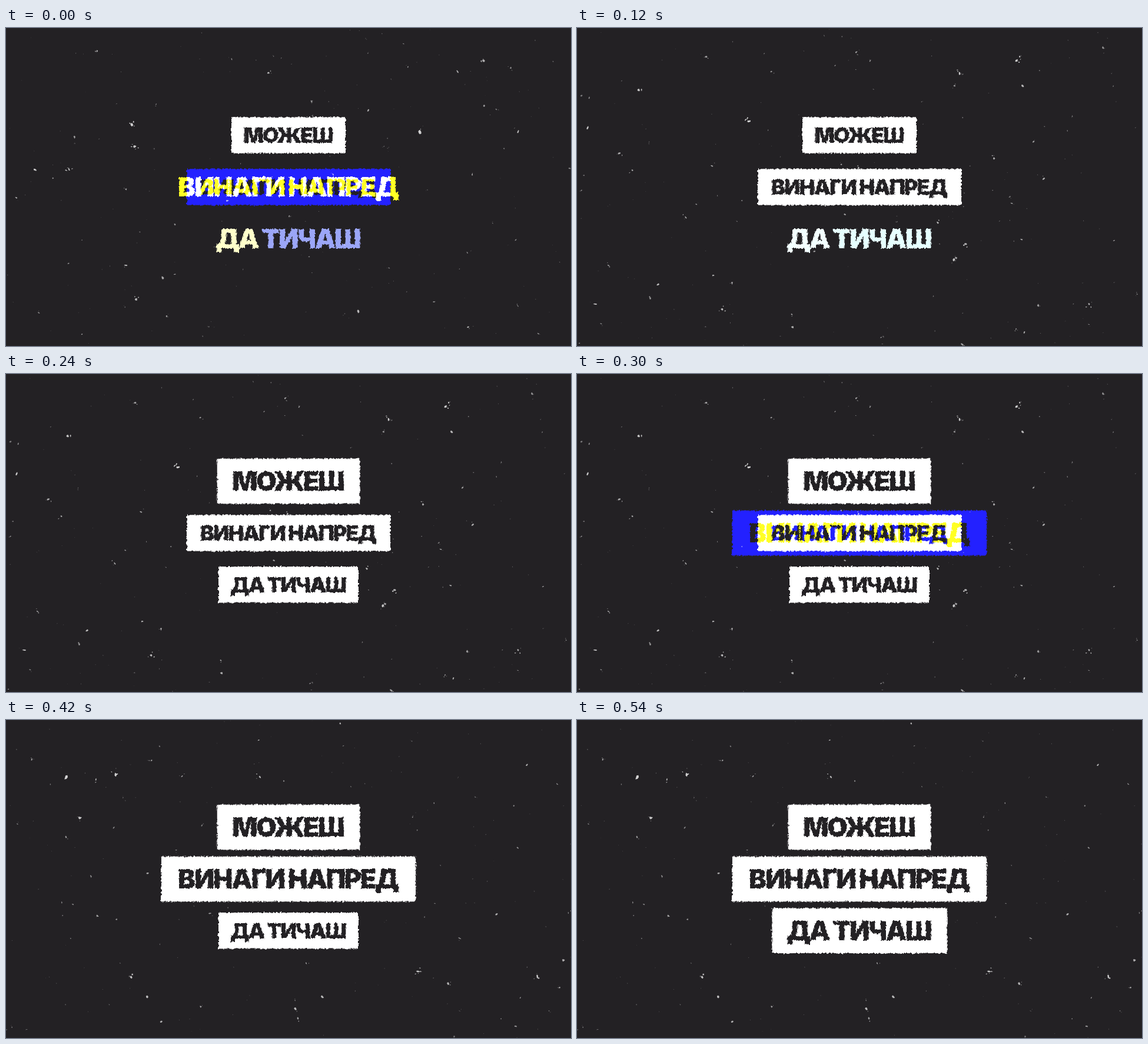
Animation of 960x540 px, one loop 0.57 s. Source, as an HTML page:

```html
<!DOCTYPE html>
<html lang="bg">
<head>
<meta charset="utf-8">
<title>Можеш винаги напред да тичаш</title>
<style>
  html, body { margin: 0; width: 100%; height: 100%; overflow: hidden; background: #000; }
  svg { display: block; width: 960px; height: 540px; isolation: isolate; background: #000; }
  .layer { mix-blend-mode: screen; }
  text { font: 900 36px Inter, "Noto Sans", sans-serif; letter-spacing: -.055em; text-anchor: middle; }
</style>
</head>
<body>
<svg id="stage" viewBox="0 0 960 540">
  <filter id="rough" filterUnits="userSpaceOnUse" x="240" y="120" width="480" height="300" color-interpolation-filters="sRGB">
    <feTurbulence type="fractalNoise" baseFrequency=".32 .22" numOctaves="2" seed="4" result="noise"/>
    <feDisplacementMap in="SourceGraphic" in2="noise" scale="5" xChannelSelector="R" yChannelSelector="G"/>
  </filter>
</svg>
<script>
const LOOP = 570, STEP = 30;
const stage = document.getElementById('stage');

// Each line steps through its looks: bare text, small box, large box.
const LINES = [
  { y: 182, w: 194, words: ['МОЖЕШ'], small: -Infinity, large: 150 },
  { y: 270, w: 346, words: ['ВИНАГИ НАПРЕД'], small: 0, large: 300 },
  { y: 357.7, w: 238, words: ['ДА', 'ТИЧАШ'], small: 150, large: 450 }
];

// Opacity flicker of the bare words, one value per step from -60 ms on.
const FLICKER = {
  'ДА': [1, 1, .76, .77, .94],
  'ТИЧАШ': [.55, .6, .97, 1, .89]
};

// The colour channels show the same scene at different delays.
const CHANNELS = [
  { white: '#f00', dark: '#230000', delay: 60 },
  { white: '#0f0', dark: '#002100', delay: 30 },
  { white: '#00f', dark: '#000024', delay: 0 }
];

const SPECKS = [
  [214,164, 703,177, 107,240, 50,241, 219,201, 870,176, 203,403, 598,481, 221,461, 785,508, 17,288, 767,74, 155,39, 266,424],
  [292,158, 650,77, 747,55, 18,170, 105,106, 31,469, 138,435, 247,478, 660,367, 760,517, 870,469, 72,213, 185,322, 53,403],
  [102,97, 186,93, 701,427, 903,435, 126,166, 213,437, 240,470, 492,490, 537,470, 568,6, 885,76, 947,408, 240,260, 440,265]
];

function add(parent, tag, attrs, text) {
  const el = document.createElementNS('http://www.w3.org/2000/svg', tag);
  for (const key in attrs) el.setAttribute(key, attrs[key]);
  if (text) el.textContent = text;
  return parent.appendChild(el);
}

function random(seed) {
  return () => {
    seed = (seed + 0x6D2B79F5) | 0;
    let n = Math.imul(seed ^ (seed >>> 15), 1 | seed);
    n = (n + Math.imul(n ^ (n >>> 7), 61 | n)) ^ n;
    return ((n ^ (n >>> 14)) >>> 0) / 4294967296;
  };
}

function blob(rnd, x, y, r) {
  const tilt = rnd() * Math.PI, thin = .3 + rnd() * .5;
  let d = '';
  for (let i = 0; i < 6; i++) {
    const a = i * Math.PI / 3, k = r * (.5 + rnd() * .8);
    const u = Math.cos(a) * k, v = Math.sin(a) * k * thin;
    const px = x + u * Math.cos(tilt) - v * Math.sin(tilt);
    const py = y + u * Math.sin(tilt) + v * Math.cos(tilt);
    d += (i ? 'L' : 'M') + px.toFixed(1) + ' ' + py.toFixed(1);
  }
  return d + 'Z';
}

function speck(group, rnd, x, y, size, light) {
  let d = blob(rnd, x, y, size);
  const extra = Math.floor(rnd() * size * 1.3);
  for (let i = 0; i < extra; i++) {
    d += blob(rnd, x + (rnd() - .5) * size * 4, y + (rnd() - .5) * size * 4, size * (.2 + rnd() * .4));
  }
  add(group, 'path', { d, fill: `rgb(${light},${light},${light})` });
}

function makeDust(points, seed) {
  const group = add(stage, 'g', { class: 'layer' });
  const rnd = random(seed);
  for (let i = 0; i < 190; i++) {
    const power = rnd() ** 3;
    speck(group, rnd, rnd() * 960, rnd() * 540, .7 + power * 2, Math.round(50 + rnd() * 50 + power * 90));
  }
  for (let i = 0; i < points.length; i += 2) {
    const size = 3.6 - i * .05;
    speck(group, rnd, points[i], points[i + 1], size, Math.round(205 - i * 2));
  }
  return group;
}

function makeLine(parent, line, channel) {
  const g = add(parent, 'g', {});
  const box = add(g, 'rect', { x: -line.w / 2, y: -30.7, width: line.w, height: 61.4, fill: channel.white });
  const text = add(g, 'text', { x: -1, y: 13 });
  const words = line.words.map((word, i) => {
    if (i) text.append(' ');
    return add(text, 'tspan', {}, word);
  });
  return { line, g, box, words };
}

for (const channel of CHANNELS) {
  const layer = add(stage, 'g', { class: 'layer' });
  add(layer, 'rect', { width: 960, height: 540, fill: channel.dark });
  const rough = add(layer, 'g', { filter: 'url(#rough)' });
  channel.parts = LINES.map(line => makeLine(rough, line, channel));
}
const dust = SPECKS.map((points, i) => makeDust(points, 11 + i * 7));

function showLine({ line, g, box, words }, time, channel) {
  const boxed = time >= line.small;
  const scale = boxed && time < line.large ? 1 : 1.25;
  g.setAttribute('transform', `translate(480 ${line.y}) scale(${scale})`);
  box.setAttribute('visibility', boxed ? 'visible' : 'hidden');
  words.forEach((word, i) => {
    const levels = FLICKER[line.words[i]] || [];
    word.setAttribute('fill', boxed ? channel.dark : channel.white);
    word.setAttribute('fill-opacity', boxed ? 1 : levels[time / STEP + 2] ?? 1);
  });
}

let shown = -1;
function draw() {
  const step = Math.floor(performance.now() % LOOP / STEP);
  if (step !== shown) {
    shown = step;
    const time = step * STEP;
    for (const channel of CHANNELS) {
      for (const part of channel.parts) showLine(part, time - channel.delay, channel);
    }
    const current = time < 120 ? 0 : time < 420 ? 1 : 2;
    dust.forEach((group, i) => group.setAttribute('display', i === current ? 'inline' : 'none'));
  }
  requestAnimationFrame(draw);
}
draw();
</script>
</body>
</html>
```
